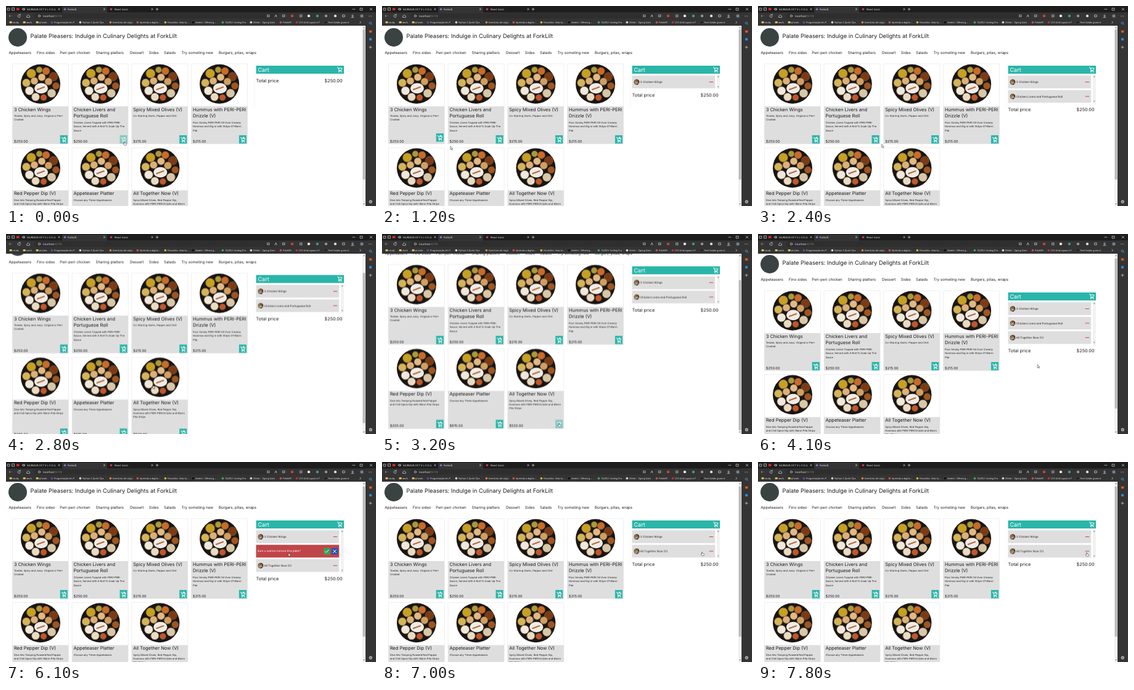
Animation, 600 px wide and 325 px high, one loop 8000 ms. Source, as an HTML page:

```html
<!DOCTYPE html>
<html lang="en">
<head>
<meta charset="utf-8">
<title>Food ordering</title>
<style>
  html, body { margin: 0; width: 100%; height: 100%; overflow: hidden; background: #fff; }
  svg { display: block; width: 600px; height: 325px; }
  text { font-family: Inter, "Open Sans", sans-serif; text-rendering: geometricPrecision; white-space: pre; }
  .ui text { font-family: "Open Sans", "Noto Sans", sans-serif; }
  .line { fill: none; stroke: #ddd; stroke-width: .7; stroke-linecap: round; stroke-linejoin: round; }
</style>
</head>
<body>
<svg id="stage" viewBox="0 0 600 325"></svg>
<script>
const LOOP = 8000, STEP = 100;
const TEAL = '#2ab5a9', GREY = '#dedede', INK = '#1c1c1c', BAR = '#343434';
const MAX_SCROLL = 44.5, ROW = 23.4;

const text = (x, y, s, size, fill = INK, more = '') =>
  `<text x="${x}" y="${y}" font-size="${size}" fill="${fill}" ${more}>${s}</text>`;
const rect = (x, y, w, h, fill, more = '') =>
  `<rect x="${x}" y="${y}" width="${w}" height="${h}" fill="${fill}" ${more}/>`;
const dot = (x, y, r, fill, more = '') =>
  `<circle cx="${x}" cy="${y}" r="${r}" fill="${fill}" ${more}/>`;
const line = (d, more = '') => `<path class="line" d="${d}" ${more}/>`;
const group = (id, body) => `<g id="${id}">${body}</g>`;
const use = (id, x, y, scale = 1) =>
  `<use href="#${id}" transform="translate(${x} ${y}) scale(${scale})"/>`;

// Plate of food: x, y, radius, colour of each dish
const dishes = [
  [-15, -17, 7.5, '#c6a022'], [-2, -23, 5, '#a99a3a'], [9, -21, 6, '#cc6a28'],
  [21, -12, 7, '#7d3a14'], [-23, -2, 6.5, '#d3b457'], [25, 3, 5.5, '#a3541f'],
  [-10, -5, 6, '#dcb07a'], [2, -11, 6, '#e0b987'], [13, -4, 6, '#cf9f63'],
  [-18, 11, 7, '#efe8dc'], [-8, 21, 6.5, '#e8dcc6'], [5, 22, 5, '#c5552a'],
  [18, 15, 7, '#d8c8aa']
];
const plate = dot(0, 0, 32, '#191512') +
  dishes.map(([x, y, r, c]) => dot(x, y, r, c, 'stroke="#6b5232" stroke-width=".8"')).join('') +
  '<ellipse cx="1" cy="7" rx="11" ry="8.5" fill="#f1ece6"/>' +
  '<path d="M-5 9l11-4" fill="none" stroke="#b56b3c" stroke-width="2.2" stroke-linecap="round"/>';

const trolley = '<path d="M-4-3.2h1.7l1.3 4.6h3.8l1-3.4h-5.4M-1 1.4l-.8 1.4h5" fill="none" ' +
  'stroke="#fff" stroke-width=".95"/>' + dot(-1, 4, .85, '#fff') + dot(2.8, 4, .85, '#fff');
const plus = '<path d="M1.4-4.6v3.2M-.2-3h3.2" stroke="#fff" stroke-width=".9"/>';

const defs = `<defs>
  <clipPath id="view"><rect y="32" width="578" height="293"/></clipPath>
  <g id="plate">${plate}</g><g id="trolley">${trolley}</g>
  <g id="add">${trolley + plus}</g></defs>`;

const meals = [
  [['3 Chicken Wings'], ['Tender, Spicy and Juicy. Original or Peri-', 'Crusted'], '250'],
  [['Chicken Livers and', 'Portuguese Roll'],
    ['Chicken Livers Topped with PERI-PERI', 'Sauce, Served with A Roll To Soak Up The', 'Sauce'], '250'],
  [['Spicy Mixed Olives (V)'], ['Co-Starring Garlic, Pepper and Chili'], '215'],
  [['Hummus with PERI-PERI', 'Drizzle (V)'],
    ['Pour Smoky PERI-PERI Oil Over Creamy', 'Hummus and Dig in with Strips Of Warm', 'Pita'], '215'],
  [['Red Pepper Dip (V)'],
    ['Dive Into Temping Roasted Red Pepper', 'and Chili Spice Dip with Warm Pita Strips'], '205'],
  [['Appeteaser Platter'], ['Choose any Three Appeteasers'], '615'],
  [['All Together Now (V)'],
    ['Spicy Mixed Olives, Red Pepper Dip,', 'Hummus with PERI-PERI Drizzle and Warm', 'Pita Strips'], '520']
];

function card([names, notes, price], i) {
  const x = 10.4 + i % 4 * 96.7, y = 94 + Math.floor(i / 4) * 136.5;
  const noteY = y + 75.3 + names.length * 10.8;
  return rect(x, y, 91, 130, '#fff', 'stroke="#ececec" stroke-width=".8"') +
    use('plate', x + 45.6, y + 32.8) +
    rect(x, y + 69, 91, 61, GREY) +
    names.map((s, n) => text(x + 2.5, y + 76.9 + n * 10.4, s, 7.5)).join('') +
    notes.map((s, n) => text(x + 2.5, noteY + n * 6.3, s, 4.15)).join('') +
    text(x + 2.5, y + 127.6, `$${price}.00`, 5.7) +
    group('buy' + i, rect(x + 77.4, y + 116, 12, 13.5, TEAL) + use('add', x + 83.3, y + 123));
}

const slot = n => 113.2 + n * ROW;

function cartItem(id, n, name) {
  const y = slot(n);
  return group(id, rect(405.6, y, 134.6, 20.6, GREY) + use('plate', 413, y + 10.4, .135) +
    text(418.8, y + 12, name, 4.5) + rect(530.6, y + 9.8, 6.6, 1, '#c9434a'));
}

const confirmBar = y => rect(405.6, y, 134.6, 20.6, '#c04548') +
  text(407.4, y + 11.8, 'Sure u wanna remove this plate?', 4.6, '#fff') +
  rect(515, y + 5.2, 10.4, 10.6, '#35a353') + rect(527.8, y + 5.2, 10.4, 10.6, '#2c50b4') +
  line(`M517.5 ${y + 10.5}l2 2 3.6-4.3`, 'style="stroke:#fff;stroke-width:1"') +
  line(`M530.4 ${y + 8}l5 5m0-5l-5 5`, 'style="stroke:#fff;stroke-width:1"');

// Narrow scrollbar of the cart list; its track moves up behind a fixed window
const listBar = group('listBar', group('listTrack', rect(543, 112, 4.6, 22, '#f1f1f1')) +
  '<path d="M543.9 115.4l1.4-1.8 1.4 1.8z" fill="#777"/>' +
  group('listEnd', '<path d="M543.9 130.8l1.4 1.8 1.4-1.8z" fill="#777"/>'));

const cart = rect(402.6, 93, .7, 75, '#f2f2f2') +
  rect(405.6, 97, 142.4, 13, TEAL) + text(408.4, 106.8, 'Cart', 9.2, '#fff') +
  use('trolley', 541, 103) +
  cartItem('wings', 0, '3 Chicken Wings') +
  cartItem('livers', 1, 'Chicken Livers and Portuguese Roll') +
  cartItem('together', 2, 'All Together Now (V)') +
  group('confirm', confirmBar(slot(1))) + listBar +
  group('total', text(405.6, 124.3, 'Total price', 7.35) +
    text(545.6, 124.3, '$250.00', 7.3, INK, 'text-anchor="end"'));

const nav = [[4.5, 'Appeteasers'], [50, 'Fino sides'], [87.3, 'Peri-peri chicken'],
  [145.6, 'Sharing platters'], [201, 'Dessert'], [231.8, 'Sides'], [256, 'Salads'],
  [284.6, 'Try someting new'], [345, 'Burgers, pitas, wraps']];

const page = dot(19, 51, 15, '#3b4242') +
  text(39.6, 52.3, 'Palate Pleasers: Indulge in Culinary Delights at ForkLilt', 9.25) +
  nav.map(([x, s]) => text(x, 77.5, s, 6.1)).join('') +
  meals.map(card).join('') + cart;

// Browser frame
const marks = [[78, '#7b3fb5', 'Programação em P'], [124, '#d8d8d8', 'Python 3 Quick Tips'],
  [173, '#e0843a', 'Exercícios de Lógic'], [217, '#d8503c', 'Aprenda a digitar...'],
  [262, '#d8b83c', 'Paramiko- How to...'], [307, '#111', 'Inkelm – Where g...'],
  [355, '#3fae5a', '10,000+ Coding Pra'], [401, '#ddd', 'KVerb – Typing Gam'],
  [449, '#c9504a', 'PokéAPI'], [475, '#d02c2c', 'CSS Grid Layout e F'],
  [522, '#222', 'Tech Guide: guias d']];
const folders = [[11, 'study'], [33, 'work'], [54, 'private']];
const tools = [[464, '#d8432c'], [491, '#eee'], [505, '#3c9c9c'], [519, '#999'], [534, '#ddd']];
const cross = (x, y, r) => line(`M${x - r} ${y - r}l${2 * r} ${2 * r}m0 ${-2 * r}l${-2 * r} ${2 * r}`);

const chrome = rect(0, 0, 600, 11, '#1d1d1d') + rect(0, 10.5, 600, 21.5, BAR) +
  rect(583, 10.5, 17, 315, BAR) +
  rect(91, 1, 73, 11, BAR, 'rx="1.5"') +
  line('M2.5 3.5h3.5v3.5h-3.5zM10 3h3.5v4h-3.5z') +
  rect(17, 3.4, 4.6, 3.4, '#e02a2a') + line('M27 4.3h1l1.2-1v3.8l-1.2-1h-1zM30.3 4.2v2') +
  text(34, 6.7, 'MURMUR OF T E L V O (L', 4.1, '#eee') + cross(86, 5.2, 1.1) +
  dot(95.5, 5.2, 1.8, '#8a6be0') + text(100, 6.7, 'ForkLilt', 4.2, '#fff') + cross(159.5, 5.2, 1.1) +
  dot(170.5, 5.2, 1.8, '#e0345e') + text(176, 6.7, 'React Icons', 4.2, '#eee') + cross(237, 5.2, 1.1) +
  line('M243 5.2h4m-2-2v4') +
  line('M562 5.2h4M574.5 3.5h3.5v3.5h-3.5z') + cross(592, 5.2, 1.7) +
  line('M5 16.2h4.4M7 14.2l-2 2 2 2', 'opacity=".5"') +
  line('M22.6 14.5a2.2 2.2 0 1 0 .8 2M23.2 13.2v1.6h-1.6M34 16.2l2.2-2 2.2 2v2.2h-4.4z') +
  rect(46, 12, 396, 8.6, '#2e2e2e', 'rx="2"') + dot(54, 16.2, 1.7, 'none', 'class="line"') +
  text(60, 17.8, 'localhost<tspan fill="#999">:5173</tspan>', 4.5, '#eee') +
  line('M424 14.5h3v3h-3zM436 18l1.6-4 1.6 4M449 14.5h3v3h-3zM477 14.5h3v3.2h-3z') +
  tools.map(([x, c]) => dot(x, 16.2, 2.1, c)).join('') +
  line('M546 14.5h3.2v3.2h-3.2zM562 13.8v3.4m-1.5-1.4l1.5 1.4 1.5-1.4M560 18.6h4') +
  dot(577, 16.2, 2.6, '#6d7f96') +
  [588.8, 590.8, 592.8].map(x => dot(x, 16.2, .5, '#ddd')).join('') +
  folders.map(([x, s]) => rect(x - 5.3, 25, 4, 3, '#e9c35a', 'rx=".5"') + text(x, 28, s, 3.8, '#eee')).join('') +
  marks.map(([x, c, s]) => dot(x - 3.6, 26.6, 1.8, c) + text(x, 28, s, 3.75, '#eee')).join('') +
  line('M574 25l1.5 1.6-1.5 1.6') +
  dot(590.8, 27.5, 1.7, 'none', 'class="line" style="stroke:#5aa9e8"') +
  line('M592.2 29l1.4 1.4', 'style="stroke:#5aa9e8"') +
  rect(588.8, 39.6, 4.6, 3.6, '#d4562e', 'rx=".6"') + dot(591, 54, 2.3, '#2f86d8') +
  line('M589 67h4m-2-2v4') +
  dot(591.3, 318, 2, 'none', 'class="line" style="stroke-width:1.1;stroke-dasharray:1.1 .5"') +
  dot(591.3, 318, .7, '#ddd');

const scrollbar = rect(578, 32, 5, 293, '#f1f1f1') +
  '<path d="M579.2 36l1.3-1.8 1.3 1.8zM579.2 321l1.3 1.8 1.3-1.8z" fill="#666"/>' +
  group('thumb', rect(578.6, 38, 3.8, 244, '#b9b9b9'));

const pointer = 'fill="#fff" stroke="#222" stroke-width=".5" stroke-linejoin="round"';
const cursor = group('cursor',
  group('arrow', `<path d="M0 0v5.4l1.3-1.1.9 1.9.9-.4-.9-1.8h1.7z" ${pointer}/>`) +
  group('hand', `<path d="M-.5.5q.6-.9 1.1 0v2l2.3.5q.6.2.5.9l-.5 2.3h-3.2l-1.7-2.3q.3-.9 1.5 0z" ${pointer}/>`));

const stage = document.getElementById('stage');
stage.innerHTML = defs + rect(0, 0, 600, 325, '#fff') +
  `<g clip-path="url(#view)">${group('page', page)}</g>` + scrollbar +
  `<g class="ui">${chrome}</g>` + cursor;

// Motion: rows are [ms, ...values]; glides advance once per STEP, other changes are hard
function track(id, rows, css, glide) {
  const frames = rows.map(([t, ...v], i) => {
    const next = i + 1 < rows.length ? rows[i + 1][0] : LOOP;
    const n = glide ? Math.max(1, Math.round((next - t) / STEP)) : 1;
    return { offset: t / LOOP, easing: `steps(${n}, end)`, ...css(...v) };
  });
  frames.push({ ...frames[frames.length - 1], offset: 1 });
  document.getElementById(id).animate(frames, { duration: LOOP, iterations: Infinity, delay: -1 });
}
const shift = (x, y) => ({ transform: `translate(${x}px, ${y}px)` });
const drop = y => shift(0, y);
const fade = opacity => ({ opacity });
const show = (id, from, to = LOOP) =>
  track(id, [[0, 0], [from, 1], ...(to < LOOP ? [[to, 0]] : [])], fade);

const scroll = [[0, 0], [2500, 0], [2700, 14], [2800, 30.4], [2900, 41], [3000, MAX_SCROLL],
  [3900, MAX_SCROLL], [4000, 20], [4100, 2]];
track('page', scroll, y => drop(-y), true);
track('thumb', scroll, y => drop(y * 37 / MAX_SCROLL), true);

track('cursor', [[0, 192, 220], [200, 188, 220], [700, 94, 216], [900, 94, 216], [1200, 111, 228],
  [1500, 150, 284], [1700, 200, 262], [1900, 192, 220], [2300, 191, 219], [2800, 238, 246],
  [3200, 287, 307], [3500, 287, 307], [3900, 443, 216], [4100, 453, 212], [4800, 532, 148],
  [4900, 533, 147], [5400, 533, 147], [5700, 461, 148], [6000, 461, 148], [6100, 458, 148],
  [6700, 519, 146], [7100, 519, 146], [7800, 533, 147]], shift, true);
const hand = [[0, 1], [300, 0], [700, 1], [1000, 0], [1900, 1], [2400, 0], [3200, 1], [3600, 0],
  [4900, 1], [5500, 0], [6600, 1]];
track('hand', hand, fade);
track('arrow', hand.map(([t, on]) => [t, 1 - on]), fade);

track('buy1', [[0, .5], [300, 1], [1900, .5], [2400, 1]], fade);
track('buy0', [[0, 1], [700, .5], [1000, 1]], fade);
track('buy0', [[0, 0], [1000, -3], [1300, 0]], drop);
track('buy6', [[0, 1], [3200, .5], [3600, 1]], fade);

show('wings', 900);
show('listBar', 900);
show('livers', 2200, 7000);
show('together', 3400);
show('confirm', 5300, 7000);
track('together', [[0, 0], [7000, -ROW]], drop);

// Number of plates in the cart sets the height of the list
const count = [[0, 0], [900, 1], [2200, 2], [3400, 3], [7000, 2]];
track('total', count, n => drop(n * ROW), false);
track('listEnd', count, n => drop((n - 1) * ROW), false);
track('listTrack', count, n => ({
  transformOrigin: '0px 112px', transform: `scaleY(${Math.max(n, 1) * 1.06})`
}), false);
</script>
</body>
</html>
```
